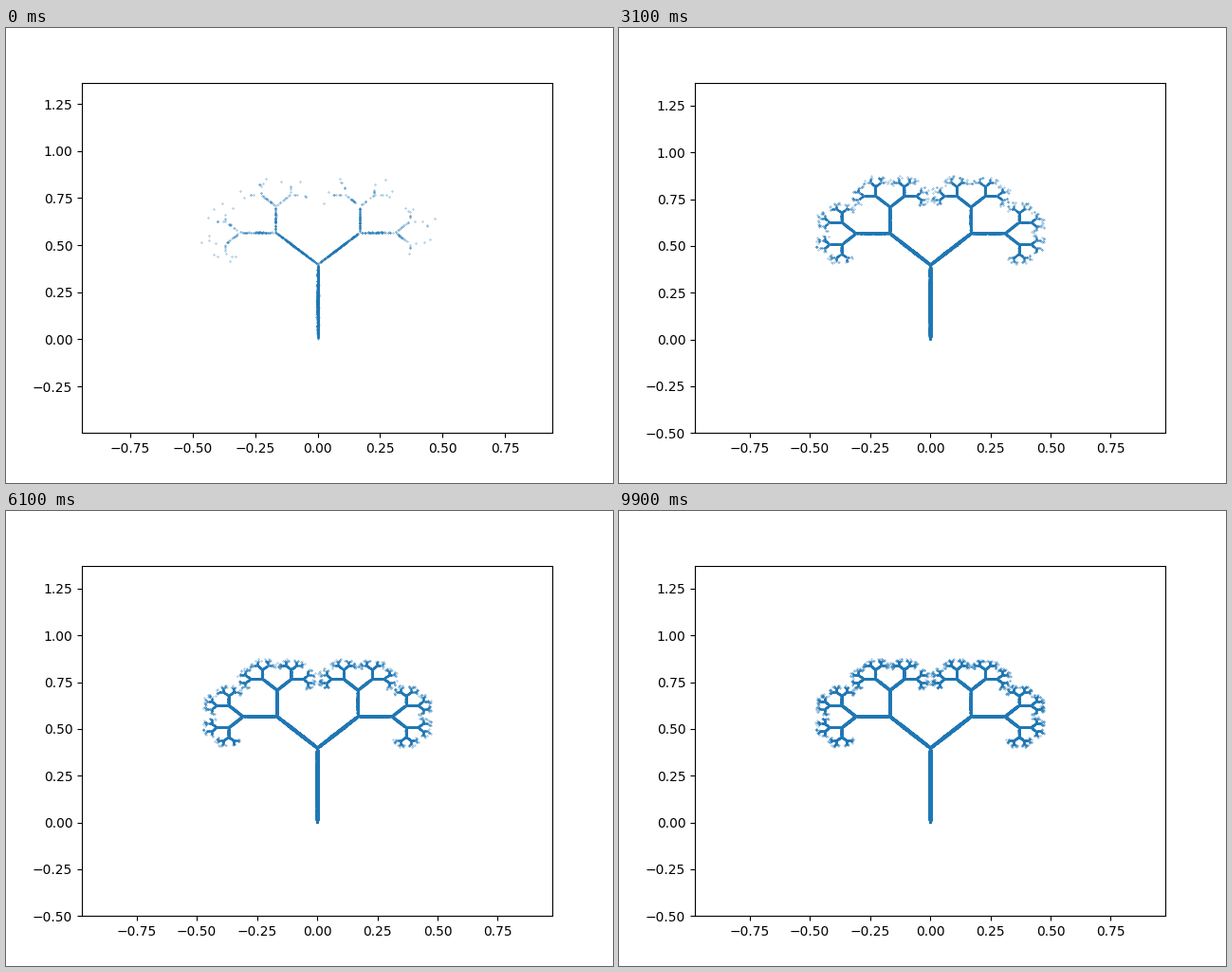
Write a matplotlib script that moves like this. It is 640 px wide and 480 px high and loops after 10000 ms.

```python
import random

import matplotlib.pyplot as plt
import numpy as np
from matplotlib.animation import FuncAnimation

FRAMES = 100
STEP = 2000      # points added per frame

LEAN = 0.42      # scale * cos 45 of the two branch maps
FORK = 0.4       # height of the trunk
TRUNK = 0.45     # the trunk maps squash the tree onto the trunk
THIN = 0.01

# View reach to the left, right, bottom and top, and how fast it settles
START = np.array([0.9425, 0.9386, 0.4975, 1.3630])
END = np.array([0.9770, 0.9765, 0.5002, 1.3735])
SETTLE = np.array([2.5, 2.5, 2.5, 10])


def trunk_up(x, y):
    return THIN * x, TRUNK * y


def trunk_down(x, y):
    return -THIN * x, FORK - TRUNK * y


def branch_left(x, y):
    return LEAN * (x - y), LEAN * (x + y) + FORK


def branch_right(x, y):
    return LEAN * (x + y), LEAN * (y - x) + FORK


def grow(count):
    """Chaos game: apply a random map to the last point."""
    maps = trunk_up, trunk_down, branch_left, branch_right
    rng = random.Random(7)
    pts = np.empty((count, 2))
    p = 0.0, FORK
    for i in range(count):
        p = rng.choice(maps)(*p)
        pts[i] = p
    return pts


points = grow(FRAMES * STEP)

fig, ax = plt.subplots(figsize=(6.4, 4.8), dpi=100)
tree, = ax.plot([], [], ".", color="C0", markersize=0.5)


def draw(frame):
    tree.set_data(*points[:(frame + 1) * STEP].T)
    left, right, bottom, top = END + (START - END) * np.exp(-frame / SETTLE)
    ax.set_xlim(-left, right)
    ax.set_ylim(-bottom, top)
    return tree,


anim = FuncAnimation(fig, draw, frames=FRAMES, interval=100,
                     repeat=True, repeat_delay=0)
plt.show()
```
